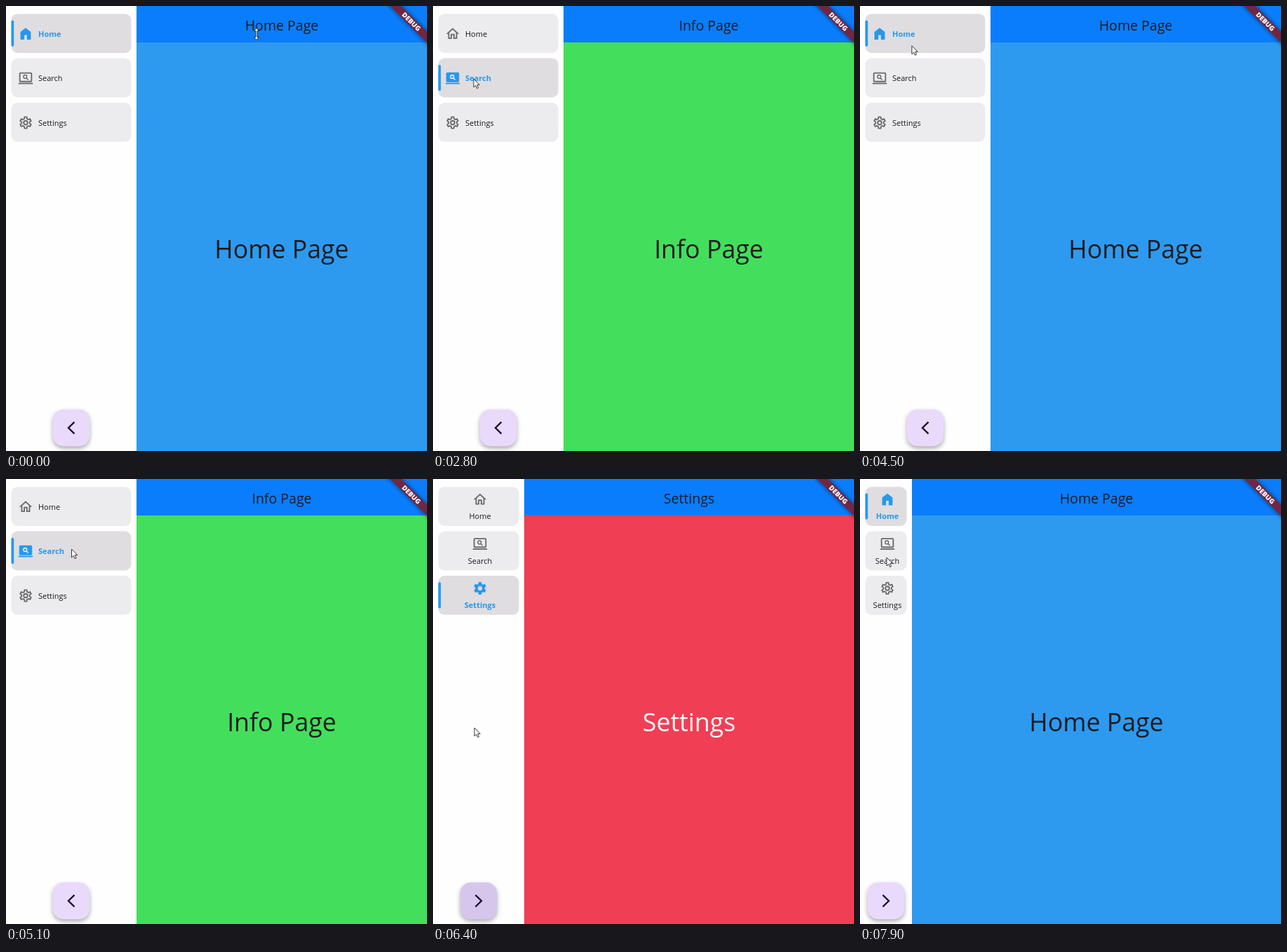
These frames come from a looping animation (600 px wide and 635 px high, 8 s). An HTML page:

```html
<!DOCTYPE html>
<html lang="en">
<head>
<meta charset="utf-8">
<title>Sidebar navigation</title>
<style>
  html, body { margin: 0; width: 100%; height: 100%; overflow: hidden; background: #fffeff; }
  svg { display: block; font-family: "Open Sans", "Noto Sans", sans-serif; }
</style>
</head>
<body>
<svg id="stage" width="600" height="635" viewBox="0 0 600 635"></svg>
<script>
const LOOP = 8000, STEP = 100;
const BLUE = '#2698ee', GREY = '#6a696c', INK = '#1b1b20';
const WIDE = 186, NARROW = 74, COLLAPSE = [6250, 6550];

const pages = [
  { label: 'Home', title: 'Home Page', color: '#2d9aef', ink: INK },
  { label: 'Search', title: 'Info Page', color: '#43df5c', ink: INK },
  { label: 'Settings', title: 'Settings', color: '#f03e54', ink: '#fff' }
];

// [time, page index]
const visits = [[0, 0], [2800, 1], [3600, 2], [4300, 0], [5000, 1], [5700, 2], [7500, 0]];

// [time, x, y] of the pointer tip
const track = [
  [0, 357, 40], [1500, 240, 176], [2300, 110, 126], [2700, 58, 104], [2900, 58, 104],
  [3500, 72.5, 168], [3700, 72.5, 168], [4200, 70, 48], [4400, 70, 48],
  [5000, 93.5, 100], [5200, 93.5, 100], [5600, 80, 168], [5700, 80, 168],
  [6100, 93, 598], [6200, 93, 598], [6400, 59, 355], [7400, 36, 48],
  [7500, 36, 48], [7900, 38, 112]
];

const clamp = v => Math.max(0, Math.min(1, v));
const mix = (a, b, k) => a + (b - a) * k;

function pointerAt(t) {
  const i = Math.max(1, track.findIndex(p => p[0] >= t));
  const a = track[i - 1], b = track[i], k = (t - a[0]) / (b[0] - a[0]);
  return [mix(a[1], b[1], k), mix(a[2], b[2], k)];
}

const rect = (x, y, w, h, fill, more = '') =>
  `<rect x="${x}" y="${y}" width="${w}" height="${h}" fill="${fill}" ${more}/>`;

const text = (s, x, y, size, fill, anchor = 'middle', weight = 400) =>
  `<text x="${x}" y="${y}" font-size="${size}" fill="${fill}" text-anchor="${anchor}" font-weight="${weight}">${s}</text>`;

// Six-toothed wheel around (12, 12)
function gear(outer, inner) {
  const points = [];
  for (let k = 0; k < 6; k++) {
    for (const [angle, r] of [[-20, inner], [-11.5, outer], [11.5, outer], [20, inner]]) {
      const a = (k * 60 + angle) * Math.PI / 180;
      points.push(`${(12 + r * Math.sin(a)).toFixed(2)} ${(12 - r * Math.cos(a)).toFixed(2)}`);
    }
  }
  return `M${points.join('L')}Z`;
}

const lens = stroke => `<g fill="none" stroke="${stroke}" stroke-width="1.5">
  <circle cx="11.2" cy="9.7" r="2.6"/><path d="M13 11.5l3 3"/></g>`;
const base = '<path d="M1 19h22v2H1z"/>';

const icons = [
  on => on
    ? '<path d="M4 21V9l8-6 8 6v12h-6v-7h-4v7z"/>'
    : '<path fill-rule="evenodd" d="M12 3L2 12h3v8h6v-6h2v6h6v-8h3zM12 5.7l5 4.5V18h-2v-6H9v6H7v-7.8z"/>',
  on => base + (on
    ? rect(2, 3, 20, 15, BLUE, 'rx="2"') + lens('#f4f4f6')
    : rect(3, 4, 18, 13, 'none', `rx="1" stroke="${GREY}" stroke-width="2"`) + lens(GREY)),
  on => on
    ? `<path fill-rule="evenodd" stroke="${BLUE}" stroke-width=".6" stroke-linejoin="round"
        d="${gear(9.6, 7)}M15.7 12a3.7 3.7 0 1 0-7.4 0a3.7 3.7 0 1 0 7.4 0Z"/>`
    : `<g fill="none" stroke="${GREY}" stroke-width="2" stroke-linejoin="round">
        <path d="${gear(8.9, 6.3)}"/><circle cx="12" cy="12" r="3"/></g>`
];

function menuItem(i, on, width, compact) {
  const top = 11.2 + 63.4 * i, center = width / 2 + 2;
  const ix = compact ? center : 28, iy = top + (compact ? 18 : 28.5);
  const color = on ? BLUE : GREY;
  return rect(7.5, top, width - 15, 55.8, on ? '#dfdde0' : '#ecebee', 'rx="9"')
    + (on ? rect(7.5, top + 9.3, 3.7, 37.2, BLUE, 'rx="1.8"') : '')
    + `<g transform="translate(${ix} ${iy}) scale(.9275) translate(-12 -12)" fill="${color}">${icons[i](on)}</g>`
    + text(pages[i].label, compact ? center : 46, top + (compact ? 46 : 32.8), 11,
        on ? BLUE : INK, compact ? 'middle' : 'start', on ? 700 : 400);
}

function toggle(x, compact, pressed) {
  const d = compact ? 'M-4.5 -8.3L4 0L-4.5 8.3' : 'M4.5 -8.3L-4 0L4.5 8.3';
  return `<g transform="translate(${x} 602)">`
    + rect(-26.2, -26.2, 52.4, 52.4, pressed ? '#d7c6ec' : '#e9dafc',
        'rx="15" style="filter:drop-shadow(0 3px 3px #0005)"')
    + `<path d="${d}" fill="none" stroke="#1d1430" stroke-width="2.4"/></g>`;
}

const banner = `<g transform="translate(600 0) rotate(45)">
  <rect x="-60" y="26" width="120" height="11.1" fill="#732641" style="filter:drop-shadow(0 0 3px #0009)"/>
  ${text('DEBUG', 0, 35, 9.6, '#fff', 'middle', 800)}</g>`;

function pointer(t) {
  const [x, y] = pointerAt(t);
  const d = t < STEP
    ? 'M0 -8.5L3.5 -4.5H1V4.5H3.5L0 8.5L-3.5 4.5H-1V-4.5H-3.5Z'
    : 'M0 0V12L2.8 9.4L4.6 13.6L6.6 12.7L4.8 8.6H8.3Z';
  return `<path transform="translate(${x} ${y})" d="${d}" fill="#fff" stroke="#222" stroke-width=".9"/>`;
}

function scene(t) {
  const current = visits.filter(v => v[0] <= t).pop()[1];
  const page = pages[current];
  const width = mix(WIDE, NARROW, clamp((t - COLLAPSE[0]) / (COLLAPSE[1] - COLLAPSE[0])));
  const compact = t >= COLLAPSE[0], middle = (width + 600) / 2;
  return rect(0, 0, 600, 635, '#fffeff')
    + rect(width, 0, 600 - width, 635, page.color)
    + rect(width, 0, 600 - width, 52, '#0a7dfc')
    + text(page.title, middle, 34.5, 19.5, INK)
    + text(page.title, middle, 360, 35.7, page.ink)
    + pages.map((_, i) => menuItem(i, i === current, width, compact)).join('')
    + toggle(width / 2, compact, t >= 6100 && t < 6600)
    + banner + pointer(t);
}

const stage = document.getElementById('stage');
const start = performance.now();
let shown = -1;

function draw() {
  const t = Math.floor((performance.now() - start) % LOOP / STEP) * STEP;
  if (t !== shown) stage.innerHTML = scene(shown = t);
  requestAnimationFrame(draw);
}
draw();
</script>
</body>
</html>
```
